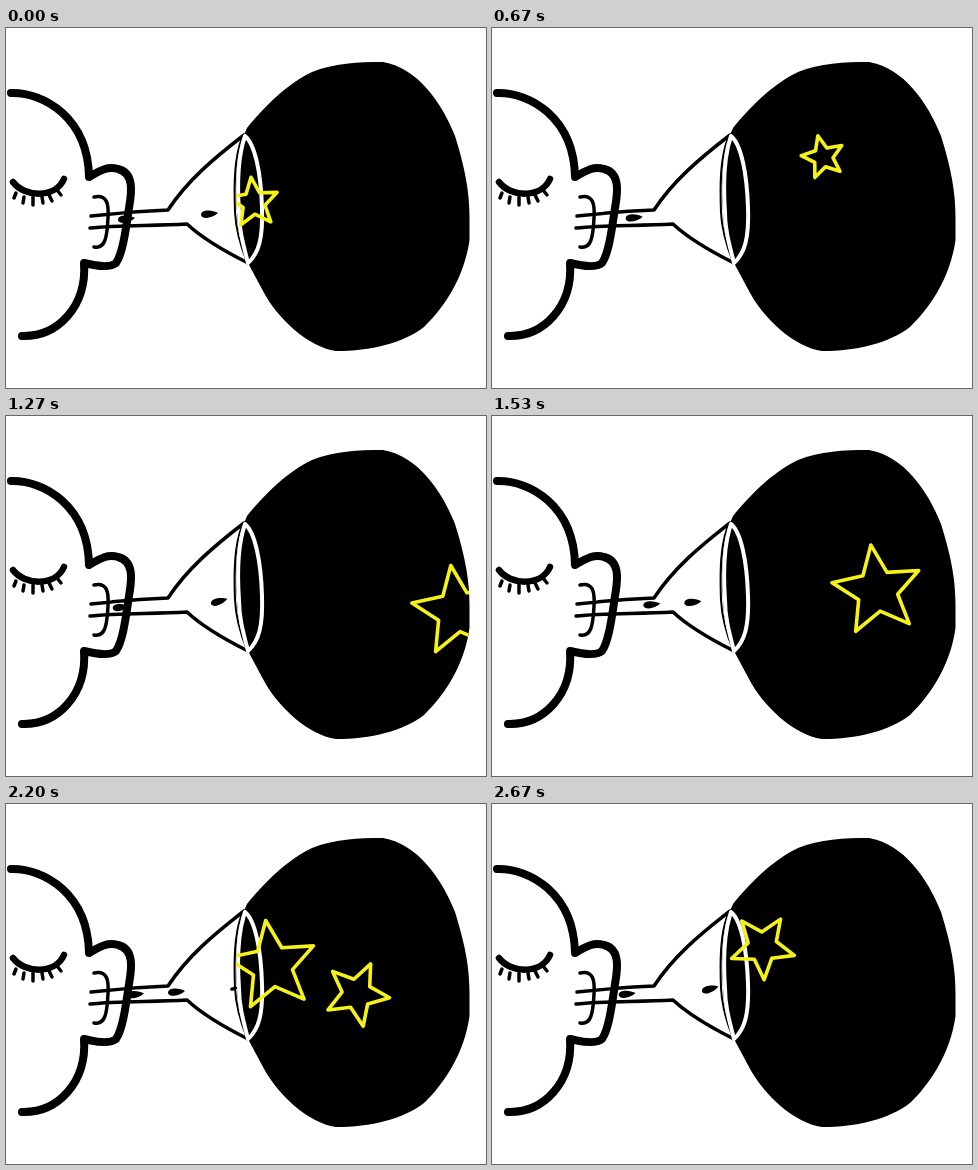
Animation, 480 px wide and 360 px high, one loop 2740 ms. Source, as an HTML page:

```html
<!DOCTYPE html>
<html lang="en">
<head>
<meta charset="utf-8">
<title>Inhaling stars</title>
<style>
  html, body { margin: 0; width: 100%; height: 100%; overflow: hidden; background: #fff; }
  svg { display: block; width: 100vw; height: 100vh; }
  path { stroke-linecap: round; stroke-linejoin: round; }
  .line { fill: none; stroke: #000; stroke-width: 3.5; }
  .bold { stroke-width: 8; }
  .rim { fill: none; stroke: #fff; stroke-width: 4; }
  #stars path { fill: none; stroke: #f5f219; stroke-width: 3.6; }
</style>
</head>
<body>
<svg viewBox="0 0 480 360">
  <defs>
    <path id="sky" d="M238 107L241 100C258 79 282 55 306 44C328 35 352 34 377 34C412 40 436 75 449 108
      C459 140 463.500 163 463.500 190V212C459 245 442 276 418 299C397 315 365 323 330 323
      C302 319 271 290 257 263L242 235C235 214 231 200 231 184C229 155 230 128 238 107Z"/>
    <clipPath id="inSky"><use href="#sky"/></clipPath>
  </defs>

  <g id="drops"></g>
  <g class="line bold">
    <path d="M5 65C38 64 82 90 83 149C95 142 102 138 112 141C128 145 126 163 123 180
      C120 200 117 225 110 235C104 240 90 238 78 235C81 278 52 309 16 308"/>
    <path stroke-width="6.5" d="M7 154C18 169 49 171 58 151"/>
  </g>
  <g class="line">
    <path d="M10 165L8 170M18 169L17 175M27 169V177M36 169L37 175M43 167L46 173M51 162L55 167"/>
    <path d="M88 169C101 166 103 176 102 190C101 210 99 221 88 219"/>
    <path d="M85 188C110 185 135 183 162 182C181 153 207 131 238 107"/>
    <path d="M84 200C112 197 145 198 181 196C197 211 216 222 242 235"/>
  </g>
  <use href="#sky"/>
  <path class="line" style="stroke-width:2" d="M236 110C228 130 228 158 229 184C230 204 235 219 241 234"/>
  <path class="rim" d="M239 108C249 116 255 145 256 180C257 210 253 225 242 235
    C236 212 233 200 233 184C231 155 232 128 239 108Z"/>
  <g id="stars" clip-path="url(#inSky)"></g>
</svg>

<script>
const LOOP = 2740, STEP = 200 / 3, LAST_STEP = 40;
const GULP_TIME = 96, GULP_TURN = 46, THROAT = [246, 190];
const DROP_SPEED = 0.2, DROP_START = 236, DROP_END = 90;

// Each star drifts along a quadratic curve from the sky's edge to the funnel
const stars = [
  { enter: 100, leave: 1100, curve: [[483, 111], [349, 127], [215, 143]], radius: 22, angle: -134, turn: 53 },
  { enter: 1130, leave: 2400, curve: [[489, 209], [307, 139], [243, 169]], radius: 46, angle: -98, turn: 0 },
  { enter: 1540, leave: 2770, curve: [[342, 366], [417, 142], [243, 141]], radius: 33, angle: -5, turn: 22 }
];
// Moments when a drop leaves the funnel mouth
const dropTimes = [195, 660, 1150, 1355, 1665, 1870, 2160, 2575];

function addPath(id) {
  const path = document.createElementNS("http://www.w3.org/2000/svg", "path");
  return document.getElementById(id).appendChild(path);
}
const starPaths = stars.map(() => addPath("stars"));
const dropPaths = dropTimes.map(() => addPath("drops"));
dropPaths.forEach(path => path.setAttribute("d", "M9 -1C4 -4 -8 -5 -8 1C-7 6 4 4 9 -1Z"));

function starOutline(x, y, radius, angle) {
  const points = Array.from({ length: 10 }, (_, i) => {
    const a = (angle + i * 36) * Math.PI / 180;
    const r = i % 2 ? radius * 0.45 : radius;
    return `${x + r * Math.cos(a)} ${y + r * Math.sin(a)}`;
  });
  return `M${points.join("L")}Z`;
}

// At the end of its path a star is pulled down the throat, shrinking and spinning
function starPose({ enter, leave, curve, radius, angle, turn }, t) {
  const time = t < leave - LOOP ? t + LOOP : t;
  if (time < enter || time > leave) return "";
  const u = (time - enter) / (leave - enter), v = 1 - u;
  const gulp = Math.max(0, 1 - (leave - time) / GULP_TIME);
  const [x, y] = THROAT.map((throat, c) => {
    const drift = v * v * curve[0][c] + 2 * u * v * curve[1][c] + u * u * curve[2][c];
    return drift + (throat - drift) * gulp;
  });
  return starOutline(x, y, radius * (1 - gulp ** 4), angle + turn * u + GULP_TURN * gulp);
}

function dropPose(start, t) {
  const age = (t - start + LOOP) % LOOP;
  const x = DROP_START - age * DROP_SPEED;
  const y = 184 + (DROP_START - x) * 0.06;
  const scale = x > DROP_END ? Math.min(1, age / 80) : 0;
  return `translate(${x} ${y}) rotate(${x > 205 ? -10 : 0}) scale(${scale})`;
}

function draw(time) {
  const t = STEP * Math.min(LAST_STEP, Math.floor((time % LOOP + 5) / STEP));
  starPaths.forEach((path, i) => path.setAttribute("d", starPose(stars[i], t)));
  dropPaths.forEach((path, i) => path.setAttribute("transform", dropPose(dropTimes[i], t)));
}

const began = performance.now();
function tick() {
  draw(performance.now() - began);
  requestAnimationFrame(tick);
}
tick();
</script>
</body>
</html>
```
